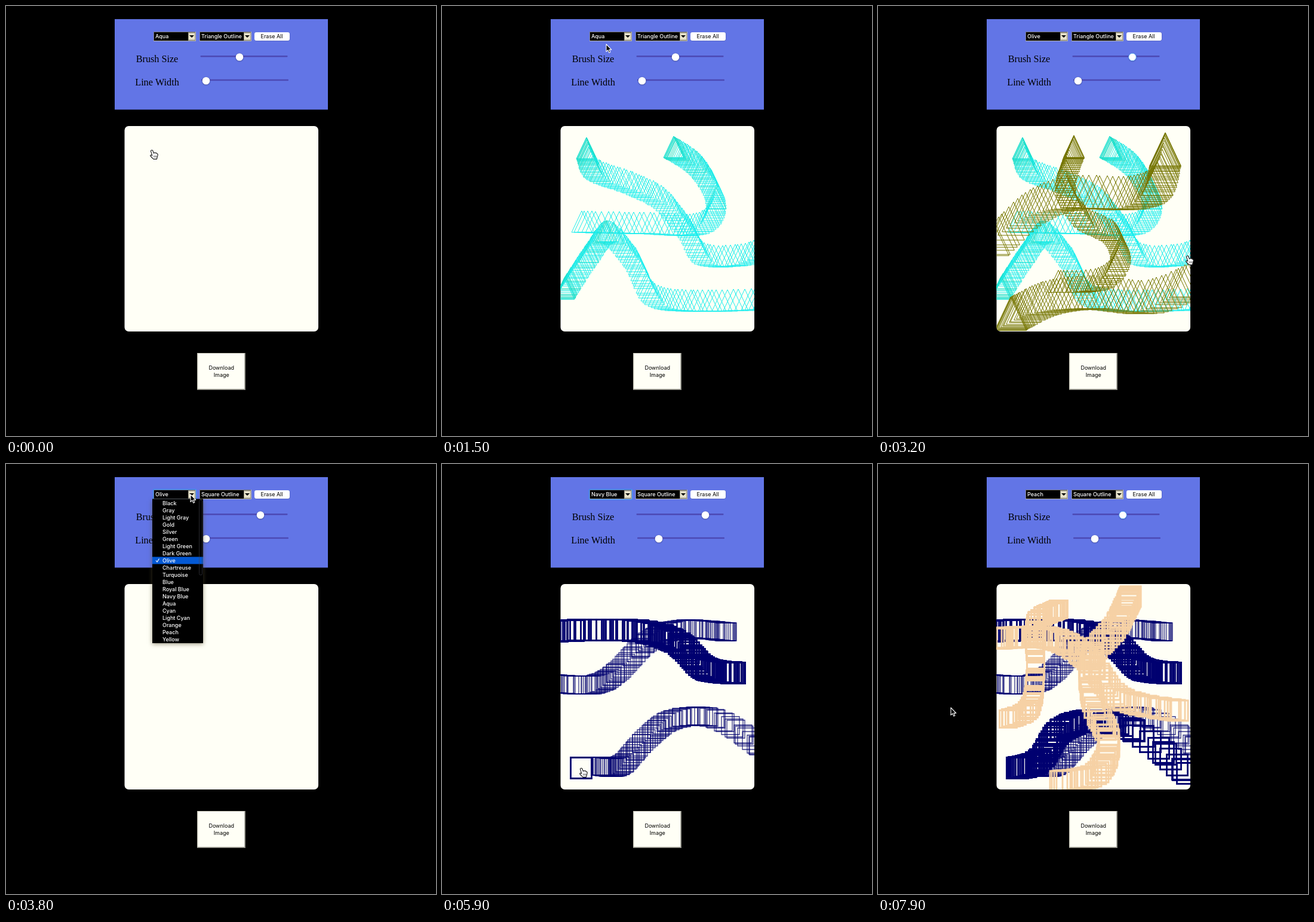
Recreate the animation shown at these times as an HTML page with a canvas. Size 720 by 720 pixels, loop 8 s.

```html
<!DOCTYPE html>
<html lang="en">
<head>
<meta charset="utf-8">
<title>Brush painter</title>
<style>
html, body { margin: 0; width: 100%; height: 100%; overflow: hidden; background: #000; }
canvas { display: block; width: 720px; height: 720px; }
</style>
</head>
<body>
<canvas id="stage" width="720" height="720"></canvas>
<script>
const g = document.getElementById('stage').getContext('2d');
const LOOP = 8000, STEP = 100, ERASE = 3350, RESHAPE = 3600;
const UI = '9px Inter, "Open Sans", sans-serif';
const UI_BOLD = '500 ' + UI;
const SERIF = '16.2px "Liberation Serif", Times, serif';
const IVORY = '#fffff6', ROW = 12;
const COLORS = ['Black', 'Gray', 'Light Gray', 'Gold', 'Silver', 'Green', 'Light Green',
  'Dark Green', 'Olive', 'Chartreuse', 'Turquoise', 'Blue', 'Royal Blue', 'Navy Blue',
  'Aqua', 'Cyan', 'Light Cyan', 'Orange', 'Peach', 'Yellow'];
const rowY = name => 65.5 + ROW * COLORS.indexOf(name);

const keys = [], strokes = [], picks = [];
const sizeBar = { x: 325.5, y: 84.5, start: 391, moves: [] };
const lineBar = { x: 327, y: 124.2, start: 335, moves: [] };

const rand = i => { const v = Math.sin(i * 127.1 + 3.7) * 43758.5453; return v - Math.floor(v); };
const clamp = v => Math.min(1, Math.max(0, v));
const mix = (a, b, u) => a + (b - a) * u;
const pace = s => clamp(s) ** 1.3; // the hand speeds up along a stroke
const value = (bar, t) =>
  bar.moves.reduce((v, m) => mix(v, m.x, clamp((t - m.from) / (m.to - m.from))), bar.start);

// Catmull-Rom through the points, equal time per span
function along(pts, u) {
  const n = pts.length - 1, i = Math.min(Math.floor(u * n), n - 1), s = u * n - i;
  const [a, b, c, d] = [-1, 0, 1, 2].map(k => pts[Math.min(Math.max(i + k, 0), n)]);
  return [0, 1].map(k => 0.5 * (2 * b[k] + (c[k] - a[k]) * s +
    (2 * a[k] - 5 * b[k] + 4 * c[k] - d[k]) * s * s +
    (3 * b[k] - a[k] - 3 * c[k] + d[k]) * s * s * s));
}

// Timeline actions
function go(t, x, y) {
  keys.push({ t, x, y });
}

function pick(t, end, name) {
  go(t, 309, 51);
  go(end - 20, 285, rowY(name));
  picks.push({ t, end, name });
}

function drag(bar, from, to, x) {
  go(from, value(bar, from), bar.y + 3);
  go(to, x, bar.y + 3);
  bar.moves.push({ from, to, x });
}

function stroke(from, to, brush, path) {
  const pts = path.split(' ').map(p => p.split(',').map(Number));
  const length = pts.reduce((sum, p, i) =>
    i ? sum + Math.hypot(p[0] - pts[i - 1][0], p[1] - pts[i - 1][1]) : 0, 0);
  const count = Math.round(length / brush.gap);
  const stamps = Array.from({ length: count + 1 }, (_, i) => {
    const s = i ? clamp((i + (rand(i + from) - 0.5) * brush.jitter) / count) : 0;
    const [x, y] = along(pts, pace(s)).map(Math.round);
    return { s, x, y };
  });
  strokes.push({ from, to, brush, pts, stamps });
  go(from, ...pts[0]);
  go(to, ...pts[pts.length - 1]);
}

const triangle = (color, size, gap, slow = color) =>
  ({ color, slow, size, gap, width: 1, jitter: 0.5, shape: 'triangle' });
const square = (color, size, width, gap) =>
  ({ color, slow: color, size, gap, width, jitter: 1.4, shape: 'square' });
const aqua = triangle('#1deeee', 36, 4.6, '#1ddfcb');
const smallOlive = triangle('#757500', 37, 4.4);
const bigOlive = triangle('#757500', 56, 6);
const thinNavy = square('rgba(0,0,112,.8)', 30, 1.3, 4);
const thickNavy = square('#000070', 35, 2.8, 4.8);
const bigPeach = square('#f6d1a5', 34, 2.8, 5);
const smallPeach = square('#f6d1a5', 29, 2.8, 4.6);

go(0, 244, 241);
stroke(90, 390, aqua, '242,238 258,272 318,295 372,322 412,370 440,414 500,416 542,402');
stroke(510, 700, aqua, '388,236 434,268 459,320 430,363 335,363 233,361');
stroke(760, 960, aqua, '205,473 245,412 278,377 322,420 358,483 440,493 542,490');
go(1500, 275, 64);
pick(1600, 1900, 'Olive');
stroke(1960, 2300, smallOlive, '328,235 314,293 345,351 396,380 404,420 370,456 302,461');
drag(sizeBar, 2400, 2550, 426);
stroke(2640, 2850, bigOlive, '481,240 466,292 420,312 320,312 250,338 192,391');
go(2900, 127, 402);
stroke(2960, 3150, bigOlive, '222,515 280,488 360,479 450,486 519,459');
go(3200, 518, 418);
go(ERASE, 445, 50);
go(RESHAPE, 403, 20);
pick(3800, 4000, 'Navy Blue');
stroke(4060, 4290, thinNavy, '478,281 400,277 345,297 295,347 255,369 185,368');
stroke(4350, 4560, thinNavy, '265,506 300,504 342,460 390,427 460,427 532,473');
drag(lineBar, 5000, 5150, 363);
drag(sizeBar, 5220, 5300, 441);
stroke(5360, 5740, thickNavy, '490,350 440,342 395,300 340,281 260,278 180,280');
stroke(5900, 6270, thickNavy, '233,509 270,497 305,447 360,430 430,447 518,518');
go(6600, 289, 282);
pick(6700, 6900, 'Peach');
stroke(6960, 7160, bigPeach, '423,222 398,272 357,325 360,398 387,465 365,519 305,531');
stroke(7220, 7370, bigPeach, '198,292 290,292 350,326 405,392 502,413');
drag(sizeBar, 7450, 7550, 410);
stroke(7640, 7800, smallPeach, '303,243 264,268 264,340 255,407 217,427');
go(LOOP - STEP, 122, 408);

function pointer(t) {
  const s = strokes.find(s => t >= s.from && t <= s.to);
  if (s) return along(s.pts, pace((t - s.from) / (s.to - s.from)));
  const i = Math.max(1, keys.findIndex(k => k.t >= t));
  const a = keys[i - 1], b = keys[i];
  const u = clamp((t - a.t) / (b.t - a.t)), e = u * u * (3 - 2 * u);
  return [mix(a.x, b.x, e), mix(a.y, b.y, e)];
}

// Drawing
function box(x, y, w, h, color, r = 0) {
  g.fillStyle = color;
  g.beginPath();
  g.roundRect(x, y, w, h, r);
  g.fill();
}

function frame(x, y, w, h, color, width = 1, r = 0) {
  g.strokeStyle = color;
  g.lineWidth = width;
  g.beginPath();
  g.roundRect(x, y, w, h, r);
  g.stroke();
}

function label(str, x, y, color, font = UI, align = 'left') {
  g.font = font;
  g.fillStyle = color;
  g.textAlign = align;
  g.fillText(str, x, y);
}

function shadow(color, blur, dy) {
  g.shadowColor = color;
  g.shadowBlur = blur;
  g.shadowOffsetY = dy;
}
const noShadow = () => shadow('transparent', 0, 0);

function select(x, w, text, focus) {
  box(x, 43, w, 16, '#b9b6ae');
  box(x, 43, w - 1, 15, '#77777d');
  box(x + 1, 44, w - 2, 14, '#000');
  box(x + w - 13, 44.5, 12, 13, '#e9e4cc');
  frame(x + w - 12.5, 45, 11, 12, '#a29e8c');
  g.fillStyle = '#000';
  g.beginPath();
  g.moveTo(x + w - 11, 49);
  g.lineTo(x + w - 3, 49);
  g.lineTo(x + w - 7, 53);
  g.fill();
  label(text, x + 3, 54.3, '#fff', UI_BOLD);
  if (focus) frame(x - 0.5, 42.5, w + 1, 17, '#3d8df5', 1.4, 1);
}

function slider(bar, t, focus) {
  box(bar.x, bar.y - 1.5, 146, 2.6, '#4c49b4', 1);
  shadow('rgba(0,0,40,.55)', 2, 0.6);
  g.beginPath();
  g.arc(value(bar, t), bar.y + 1, 6.3, 0, 7);
  g.fillStyle = '#fff';
  g.fill();
  noShadow();
  if (!focus) return;
  g.strokeStyle = '#5fa8f5';
  g.lineWidth = 1;
  g.stroke();
}

function stamp(x, y, { shape, size }) {
  const h = size / 2, w = size * 0.47;
  g.beginPath();
  if (shape === 'square') {
    g.rect(x - h, y - h, size, size);
  } else {
    g.moveTo(x, y - h);
    g.lineTo(x + w, y + h);
    g.lineTo(x - w, y + h);
    g.closePath();
  }
  g.stroke();
}

function painting(t) {
  box(198.5, 201, 324.5, 344, IVORY, 7);
  g.save();
  g.clip();
  for (const { from, to, brush, stamps } of strokes) {
    if (t < from || (t >= ERASE && from < ERASE)) continue;
    const now = (t - from) / (to - from);
    g.lineWidth = brush.width;
    stamps.forEach(({ s, x, y }, i) => {
      if (s > now) return;
      const last = stamps[i - 1];
      const slow = last && Math.hypot(x - last.x, y - last.y) < 2.6;
      g.strokeStyle = slow ? brush.slow : brush.color;
      stamp(x, y, brush);
    });
  }
  g.restore();
}

function menu(current, py) {
  shadow('rgba(90,80,50,.6)', 7, 2);
  box(245, 58.5, 85, 241.5, '#000');
  noShadow();
  const hover = py > 60 ? Math.floor((py - 59.5) / ROW) : COLORS.indexOf(current);
  box(245, 59.5 + hover * ROW, 85, ROW, '#0459d4');
  for (const name of COLORS) label(name, 262, rowY(name) + 3.3, '#fff', UI_BOLD);
  const y = rowY(current);
  g.strokeStyle = '#fff';
  g.lineWidth = 1.2;
  g.beginPath();
  g.moveTo(251, y);
  g.lineTo(253, y + 2.5);
  g.lineTo(256.5, y - 3);
  g.stroke();
  frame(323.5, 60, 5, 126, 'rgba(70,70,80,.55)', 1, 2.5);
}

const ARROW = new Path2D('M0 0V12.4L2.8 9.8L4.8 14.2L6.8 13.3L4.9 9.1H8.8Z');
const HAND = new Path2D('M-1.6 1.6Q0 -1 1.8 1.2L3.4 5.6Q4.8 3.6 6.2 5.2Q7.9 4.2 8.6 6.2Q10.2 6 10.2 8.4L8.4 15.4H3Q-.6 12.2 -2.4 9.6Q-1.8 7.6 .7 9.4Z');
const KNUCKLES = new Path2D('M3.8 9.5V12.5M5.8 9.5V12.5M7.7 9.5V12.5');

function cursor([x, y], open) {
  const hand = !open && x > 198 && x < 523 && y > 201 && y < 545;
  const shape = hand ? HAND : ARROW;
  g.save();
  g.translate(x, y);
  g.lineJoin = 'round';
  g.lineWidth = 1.1;
  g.fillStyle = hand ? '#fff' : '#000';
  g.strokeStyle = hand ? '#151515' : '#fff';
  g.fill(shape);
  g.stroke(shape);
  g.lineWidth = 0.7;
  if (hand) g.stroke(KNUCKLES);
  g.restore();
}

function draw(t) {
  const color = picks.reduce((name, p) => t >= p.end ? p.name : name, 'Aqua');
  const open = picks.some(p => t >= p.t && t < p.end);
  const onList = t >= 3800 && t < 7450;
  const at = pointer(t);

  box(0, 0, 720, 720, '#000');
  box(182, 22, 357, 151.5, '#6275e6');
  select(247, 71, color, open || onList);
  select(324, 87, t < RESHAPE ? 'Triangle Outline' : 'Square Outline', false);
  box(416, 44, 59.5, 14.5, '#4d5bb0', 3);
  box(416, 44, 59, 14, '#fff', 3);
  label('Erase All', 445, 54.3, '#000', UI, 'center');
  label('Brush Size', 253, 93.7, '#000', SERIF, 'center');
  label('Line Width', 253, 133, '#000', SERIF, 'center');
  slider(sizeBar, t, t >= 2400 && !onList);
  slider(lineBar, t, false);

  painting(t);

  box(320, 581, 81, 62, '#8b8b84');
  box(320, 581, 79.5, 60.5, '#c9c7ba');
  box(321.5, 582, 77.5, 59, IVORY);
  label('Download', 360.7, 609, '#000', UI, 'center');
  label('Image', 360.7, 621, '#000', UI, 'center');

  if (open) menu(color, at[1]);
  cursor(at, open);
}

function tick() {
  const t = performance.now() % LOOP;
  draw(Math.floor(t / STEP) * STEP);
  requestAnimationFrame(tick);
}
tick();
</script>
</body>
</html>
```
